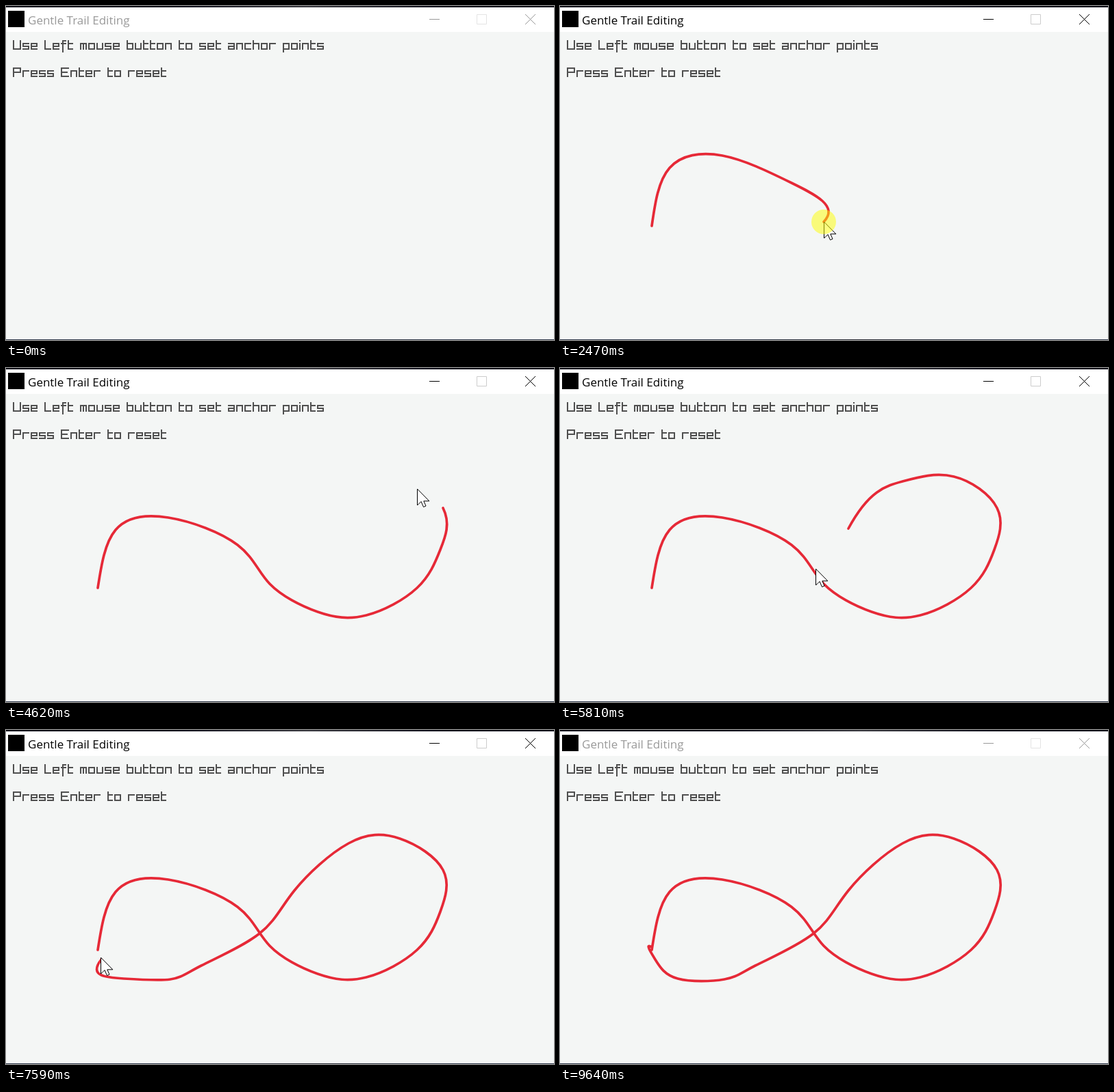
An HTML page with a canvas for the animation above (9.71 s loop, 800x489 px).

```html
<!DOCTYPE html>
<html lang="en">
<head>
<meta charset="utf-8">
<title>Gentle Trail Editing</title>
<style>
html, body { margin: 0; width: 100%; height: 100%; overflow: hidden; background: #f4f6f5; }
canvas { display: block; }
</style>
</head>
<body>
<canvas id="stage" width="800" height="489" role="img"
  aria-label="Use Left mouse button to set anchor points. Press Enter to reset"></canvas>
<script>
const ctx = document.getElementById('stage').getContext('2d');
const LOOP = 9710;
const ENTER = 140, ARRIVE = 680, FIRST = 880, STEP = 380;
const HOLD = 210, ADD_DELAY = 65;
const LEAVE = 8150, EDGE = 9170, GONE = 9320, INACTIVE = 9640;
const START_BEND = 0.5, END_BEND = 2;

// Anchors, pressed one after another at a steady pace
const anchors = [
  [134, 322], [160, 237], [237, 219], [338, 259], [385, 316], [455, 357],
  [526, 362], [600, 322], [634, 266], [638, 205], [575, 159], [500, 166],
  [421, 235], [370, 298], [285, 345], [240, 365], [172, 364], [139, 336],
  [132, 317]
];
const pressTime = i => FIRST + STEP * i;

// Stroke font on a one-unit grid, built from shared parts
const stem = 'M0 0V6', box = 'M0 2H4V6H0Z', arch = 'M0 6V2H4V6';
const glyphs = {
  U: 'M0 0V6H5V0', P: 'M0 6V0H5V3H0', E: 'M5 0H0V6H5M0 3H4', L: stem + 'H4',
  a: 'M4 4H0V6H4V2H0', b: box + stem, c: 'M4 2H0V6H4', e: 'M0 4H4V2H0V6H4',
  f: 'M3 0H1V8M0 2H3', h: arch + stem, i: 'M0 0h.01M0 2V6', m: arch + 'M2 2V6',
  n: arch, o: box, p: box + 'V8', r: 'M0 6V2H4', s: 'M4 2H0V4H4V6H0',
  t: stem + 'H3M0 2H3', u: 'M0 2V6H4V2'
};
const widths = { U: 6, P: 6, E: 6, t: 4, f: 4, i: 1, ' ': 3 };

const arrow = new Path2D('M.5 .5V24L6 18.5L9.5 26.5L13 25L9.8 17.8H17.5Z');

function rect(x, y, w, h, color) {
  ctx.fillStyle = color;
  ctx.fillRect(x, y, w, h);
}

function disc(x, y, r, color) {
  ctx.fillStyle = color;
  ctx.beginPath();
  ctx.arc(x, y, r, 0, 2 * Math.PI);
  ctx.fill();
}

function stroke(d, color) {
  ctx.strokeStyle = color;
  ctx.lineWidth = 1;
  ctx.stroke(new Path2D(d));
}

function pixelText(text, x, y) {
  ctx.save();
  ctx.translate(x + 1, y + 1);
  ctx.scale(2, 2);
  ctx.lineCap = 'square';
  ctx.lineJoin = 'miter';
  for (const c of text) {
    if (glyphs[c]) stroke(glyphs[c], '#505050');
    ctx.translate((widths[c] || 5) + 1, 0);
  }
  ctx.restore();
}

function desktopStrip(y, h, dark, light) {
  const g = ctx.createLinearGradient(0, 0, 800, 0);
  g.addColorStop(0.3, dark);
  g.addColorStop(0.55, light);
  g.addColorStop(0.8, dark);
  rect(0, y, 800, h, g);
}

function titleBar(active) {
  const ink = active ? '#000' : '#999';
  rect(0, 2, 800, 36, '#fff');
  rect(3, 7, 24, 24, '#000');
  ctx.fillStyle = ink;
  ctx.font = '17px "Open Sans", sans-serif';
  ctx.fillText('Gentle Trail Editing', 32, 27);
  ctx.lineCap = 'butt';
  stroke('M618 19.5H633', ink);
  stroke('M687.5 12.5h14v14h-14Z', active ? '#ccc' : '#e4e4e4');
  stroke('M758 12L773 27M773 12L758 27', ink);
}

// Slopes of a smooth cubic spline along one axis, by relaxation
function slopes(v) {
  const n = v.length - 1;
  const m = v.map(() => 0);
  const end = (d, inner, bend) => d + bend * (d - inner);
  for (let pass = 0; pass < 40; pass++) {
    m[0] = end(v[1] - v[0], m[1], START_BEND);
    for (let i = 1; i < n; i++) {
      m[i] = (3 * (v[i + 1] - v[i - 1]) - m[i - 1] - m[i + 1]) / 4;
    }
    m[n] = end(v[n] - v[n - 1], m[n - 1], END_BEND);
  }
  return m;
}

function curve(pts) {
  const xs = pts.map(p => p[0]), ys = pts.map(p => p[1]);
  const mx = slopes(xs), my = slopes(ys);
  ctx.beginPath();
  ctx.moveTo(xs[0], ys[0]);
  for (let i = 1; i < pts.length; i++) {
    ctx.bezierCurveTo(
      xs[i - 1] + mx[i - 1] / 3, ys[i - 1] + my[i - 1] / 3,
      xs[i] - mx[i] / 3, ys[i] - my[i] / 3, xs[i], ys[i]);
  }
  ctx.lineWidth = 3.7;
  ctx.lineCap = ctx.lineJoin = 'round';
  ctx.strokeStyle = '#e62937';
  ctx.stroke();
}

const progress = (t, from, to) => Math.min(1, Math.max(0, (t - from) / (to - from)));
const ease = u => u * u * (3 - 2 * u);
const lerp = (a, b, u) => a.map((v, i) => v + (b[i] - v) * u);
const arc = (a, c, b, u) => lerp(lerp(a, c, u), lerp(c, b, u), u);

function pointerAt(t) {
  const last = anchors.length - 1;
  if (t < FIRST) {
    return arc([561, 462], [310, 225], anchors[0], ease(progress(t, ENTER, ARRIVE)));
  }
  if (t >= LEAVE) {
    return arc(anchors[last], [430, -220], [740, 459], ease(progress(t, LEAVE, EDGE)));
  }
  const i = Math.min(last, Math.floor((t - FIRST) / STEP));
  const next = anchors[Math.min(last, i + 1)];
  return lerp(anchors[i], next, progress(t - pressTime(i), HOLD + 20, STEP));
}

function pointer(t) {
  const [x, y] = pointerAt(t);
  const sincePress = (t - FIRST) % STEP;
  const pressed = t >= FIRST && t < pressTime(anchors.length) && sincePress < HOLD;
  ctx.save();
  ctx.translate(Math.round(x), Math.round(y));
  ctx.lineJoin = 'miter';
  ctx.fillStyle = '#fff';
  ctx.fill(arrow);
  ctx.strokeStyle = '#000';
  ctx.lineWidth = 1;
  ctx.stroke(arrow);
  if (pressed) disc(0, 0, 18, 'rgba(255,255,0,.5)');
  ctx.restore();
}

function draw(t) {
  rect(0, 0, 800, 489, '#f4f6f5');
  desktopStrip(0, 2, '#11111c', '#3c3c42');
  desktopStrip(488, 1, '#303a4c', '#2a2c34');
  titleBar(t >= FIRST && t < INACTIVE);
  pixelText('Use Left mouse button to set anchor points', 10, 50);
  pixelText('Press Enter to reset', 10, 90);

  const pts = anchors.filter((_, i) => t >= pressTime(i) + ADD_DELAY);
  if (pts.length > 2) curve(pts);
  else for (const [x, y] of pts) disc(x, y, 2, '#8c1d30');

  if (t >= ENTER && t < GONE) pointer(t);
}

const start = performance.now();
function tick() {
  draw((performance.now() - start) % LOOP);
  requestAnimationFrame(tick);
}
tick();
</script>
</body>
</html>
```
